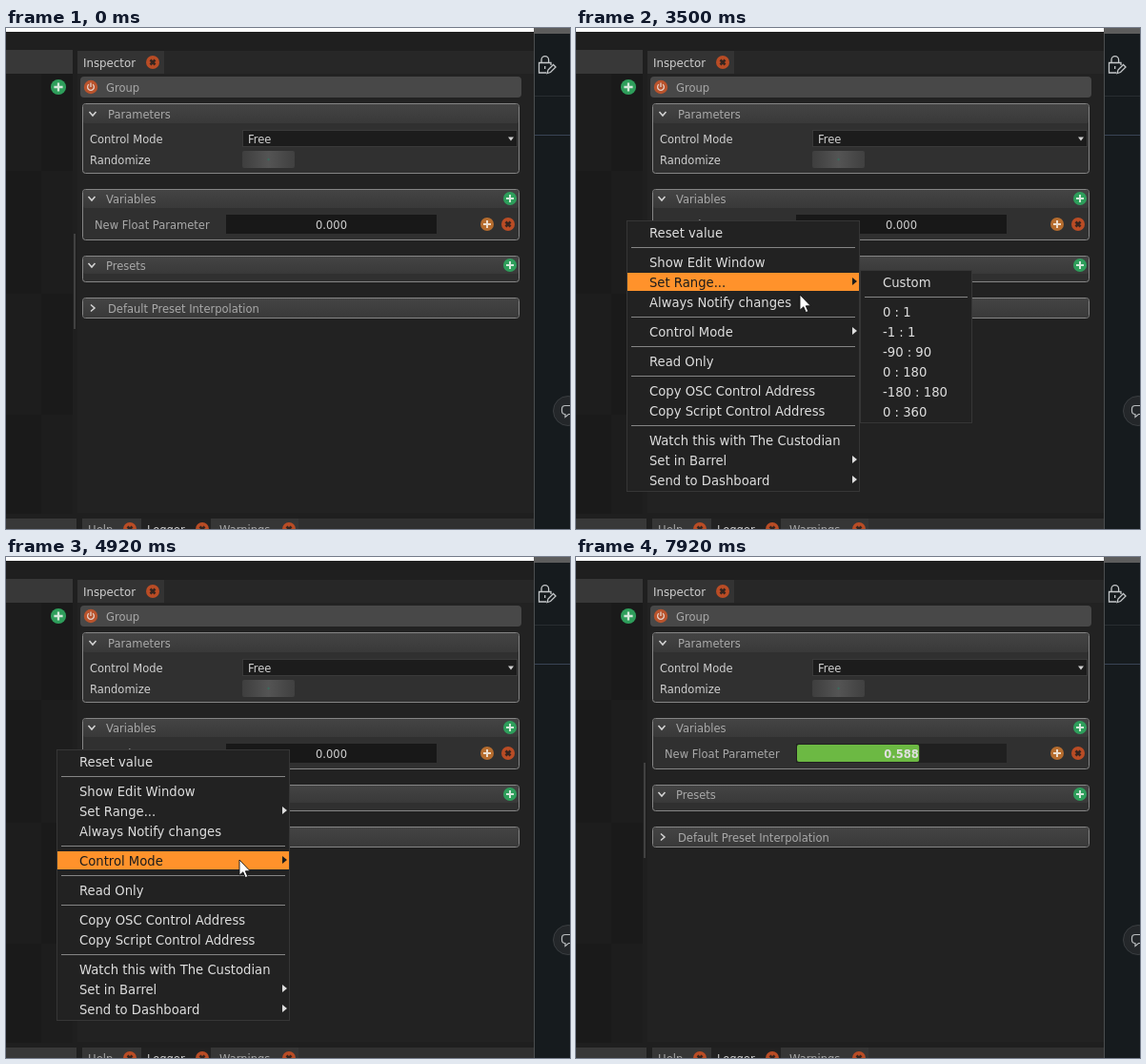
Recreate the animation shown at these times as an HTML page. Size 592 by 526 pixels, loop 8000 ms.

```html
<!DOCTYPE html>
<html lang="en">
<head>
<meta charset="utf-8">
<title>Set a parameter range</title>
<style>
  html, body { margin: 0; width: 100%; height: 100%; overflow: hidden; background: #222; }
  svg { display: block; width: 592px; height: 526px; }
  text { font: 11.5px "DejaVu Sans", sans-serif; fill: #cfcfcf; white-space: pre; }
  .dim { fill: #a9a9a9; }
  .mid { text-anchor: middle; }
  .bold { font-weight: bold; fill: #e0e0e0; }
  .menu text { font-size: 13.2px; fill: #dedede; }
  .menu .bg { fill: #222; stroke: #363636; }
  .menu .sep { fill: #858585; }
  .menu .arrow { fill: #dedede; }
  .menu .hot { fill: #ff922b; visibility: hidden; }
  .menu .on .hot { visibility: inherit; }
  .menu .on text, .menu .on .arrow { fill: #1c1c1c; }
  .box { fill: #303030; stroke: #858585; }
  .line { fill: none; stroke: #d5d5d5; stroke-width: 1.5; }
</style>
</head>
<body>
<svg viewBox="0 0 592 526">
  <defs>
    <linearGradient id="head" x2="0" y2="1">
      <stop stop-color="#444"/><stop offset="1" stop-color="#393939"/>
    </linearGradient>
    <linearGradient id="button">
      <stop stop-color="#3e3e3e"/><stop offset=".5" stop-color="#545454"/><stop offset="1" stop-color="#404040"/>
    </linearGradient>
    <path id="cross" d="M-2.5-2.5 2.5 2.5M2.5-2.5-2.5 2.5" stroke="#35251f" stroke-width="2.6"/>
    <g id="plus"><circle r="7" fill="#2e9e5b"/><path d="M-4 0H4M0-4V4" stroke="#d4e8da" stroke-width="2"/></g>
    <g id="close"><circle r="7" fill="#b94c25"/><use href="#cross"/></g>
    <path id="down" class="line" d="M-3.5-2 0 2 3.5-2"/>
  </defs>

  <!-- window frame and left panel -->
  <rect width="554" height="526" fill="#1f1f1f"/>
  <rect width="554" height="4" fill="#fff"/>
  <rect y="23" width="70" height="25" fill="#383838"/>
  <rect y="48" width="70" height="462" fill="#1d1d1d"/>
  <path d="M37 48h33v102H37zM0 150h37v129H0zM37 279h33v127H37zM0 406h37v104H0z" fill="#1a1a1a"/>
  <rect x="71" y="216" width="2" height="100" fill="#414141"/>
  <use href="#plus" transform="translate(55 62) scale(1.15)"/>

  <!-- inspector -->
  <rect x="75" y="24" width="479" height="24" fill="#272727"/>
  <rect x="75" y="24" width="91" height="24" fill="#333"/>
  <rect x="75" y="48" width="479" height="461" fill="#222"/>
  <text x="81" y="41" style="font-size:11.8px">Inspector</text>
  <use href="#close" x="154" y="36"/>
  <rect x="78" y="51" width="463" height="22" rx="4" fill="#484848"/>
  <circle cx="89" cy="62" r="7.2" fill="#b9532c"/>
  <path d="M86.9 59.3A3.4 3.4 0 1 0 91.1 59.3M89 57.5V62" fill="none" stroke="#e4cfc6" stroke-width="1.3"/>
  <text class="dim" x="105" y="67">Group</text>

  <g id="boxes"></g>
  <use href="#down" x="91" y="90"/><text class="dim" x="107" y="95">Parameters</text>
  <text x="88" y="121">Control Mode</text>
  <text x="88" y="143">Randomize</text>
  <rect x="248.5" y="107.5" width="288" height="17" fill="#1c1c1c" stroke="#3a3a3a"/>
  <text x="254" y="121">Free</text>
  <path d="M527 114.500h6l-3 4z" fill="#d0d0d0"/>
  <rect x="248" y="129" width="55" height="18" rx="2" fill="url(#button)"/>
  <circle cx="275.500" cy="138" r="1.200" fill="#3d6a5c"/>

  <use href="#down" x="90" y="179"/><text class="dim" x="105" y="184">Variables</text>
  <use href="#plus" x="529" y="179"/>
  <text class="dim" x="93" y="211">New Float Parameter</text>
  <rect id="field" x="231" y="196" width="221" height="20"/>
  <rect id="fill" x="232" y="197" height="18" rx="2" fill="#6cb943"/>
  <text id="value" class="mid" x="341.500" y="211"></text>
  <circle cx="505" cy="206" r="7" fill="#b56c2e"/>
  <path d="M501 206h8M505 202v8" stroke="#ecdccb" stroke-width="2"/>
  <use href="#close" x="527" y="206"/>

  <use href="#down" x="90" y="249"/><text class="dim" x="105" y="254">Presets</text>
  <use href="#plus" x="529" y="249"/>
  <use href="#down" transform="translate(91 294) rotate(-90)"/>
  <text class="dim" x="107" y="299">Default Preset Interpolation</text>

  <!-- bottom tabs -->
  <path d="M0 515h74v11H0z" fill="#383838"/>
  <path d="M80 515h474v11H80z" fill="#303030"/>
  <path d="M80 515h62v11H80zM215 515h92v11h-92z" fill="#363636"/>
  <path d="M142 515h73v11h-73z" fill="#222"/>
  <text x="86" y="531" class="dim">Help</text><use href="#close" x="130" y="526"/>
  <text x="148" y="531">Logger</text><use href="#close" x="206" y="526"/>
  <text x="224" y="531" class="dim">Warnings</text><use href="#close" x="297" y="526"/>

  <!-- neighbouring window -->
  <rect x="554" width="38" height="526" fill="#161b1e"/>
  <rect x="554" width="38" height="6" fill="#5d5d5d"/>
  <rect x="554" y="6" width="1" height="520" fill="#4b4e50"/>
  <path d="M555 71.500h37" stroke="#282d31"/>
  <path d="M555 112.500h37" stroke="#394456"/>
  <g fill="none" stroke="#c5c8ca" stroke-width="1.300">
    <path d="M567 47H559.500V36.500H572V39M562 36V33.500a3.800 3.800 0 0 1 7.600 0V36M565.700 40v3"/>
    <path d="M568 47.500l1-3.500 5.500-5.500 2.500 2.500-5.500 5.500z"/>
  </g>
  <circle cx="590" cy="402" r="15.500" fill="#24272a" stroke="#3a3e41"/>
  <path d="M592 396.500h-5a3.500 3.500 0 0 0-3.500 3.500v2a3.500 3.500 0 0 0 3.500 3.500v3l3.500-3h1.500" fill="none" stroke="#b9bcbe" stroke-width="1.200"/>

  <g id="menus"></g>
  <path id="cursor" d="M0 0V16.200L3.800 12.800 6.300 18.600 8.800 17.500 6.300 11.800H11.300Z" fill="#fff" stroke="#111" stroke-width=".9"/>
</svg>
<script>
const DURATION = 8000, STEP = 78.5, FIRST = 120;
const ROW = 21, GAP = 10;
const $ = id => document.getElementById(id);

function add(parent, tag, attrs, text) {
  const node = document.createElementNS('http://www.w3.org/2000/svg', tag);
  for (const name in attrs) node.setAttribute(name, attrs[name]);
  if (text) node.textContent = text;
  return parent.appendChild(node);
}

// Top, height and header height of each inspector section
for (const [y, height, head] of [[79, 74, 22], [169, 54, 21], [239, 28, 20], [283, 22, 22]]) {
  add($('boxes'), 'rect', { class: 'box', x: 80.5, y: y + .5, width: 458, height: height - 1, rx: 3 });
  add($('boxes'), 'rect', { x: 81, y: y + 1, width: 457, height: head - 2, rx: 2, fill: 'url(#head)' });
}

// '-' is a separator, a trailing '>' marks a submenu
function makeMenu(x, y, width, height, labels) {
  const root = add($('menus'), 'g', { class: 'menu' });
  add(root, 'rect', { class: 'bg', x: x + .5, y: y + .5, width: width - 1, height: height - 1 });
  const rows = [];
  let top = y + 3;
  for (const label of labels) {
    if (label === '-') {
      add(root, 'rect', { class: 'sep', x: x + 5, y: top + 4, width: width - 10, height: 1 });
      top += GAP;
      continue;
    }
    const node = add(root, 'g', {});
    add(node, 'rect', { class: 'hot', x: x + 1, y: top, width: width - 2, height: 19 });
    add(node, 'text', { x: x + 24, y: top + 15 }, label.replace('>', ''));
    if (label.endsWith('>'))
      add(node, 'path', { class: 'arrow', d: `M${x + width - 8} ${top + 5}l5 4-5 4z` });
    rows.push({ node, top });
    top += ROW;
  }
  return {
    show: on => root.setAttribute('visibility', on ? 'visible' : 'hidden'),
    rowAt: (px, py) => px > x && px < x + width - 1
      ? rows.findIndex(r => py >= r.top && py < r.top + ROW) : -1,
    light: index => rows.forEach((r, i) => r.node.classList.toggle('on', i === index))
  };
}

const SET_RANGE = 2, SEND = 10;
const mainMenu = makeMenu(53, 202, 245, 285, [
  'Reset value', '-', 'Show Edit Window', 'Set Range...>', 'Always Notify changes', '-',
  'Control Mode>', '-', 'Read Only', '-', 'Copy OSC Control Address',
  'Copy Script Control Address', '-', 'Watch this with The Custodian',
  'Set in Barrel>', 'Send to Dashboard>'
]);
const rangeMenu = makeMenu(298, 254, 118, 161,
  ['Custom', '-', '0 : 1', '-1 : 1', '-90 : 90', '0 : 180', '-180 : 180', '0 : 360']);
const sendMenu = makeMenu(298, 465, 174, 26, ['Default Dashboard']);

// Pointer tip: step, x, y
const path = [
  [0, 422, 459], [5, 310, 270], [7, 189, 170], [10, 321, 209], [13, 318, 205], [15, 318, 205],
  [16, 299, 204], [23, 299, 204], [27, 247, 204], [29, 247, 204], [32, 247, 227], [33, 247, 227],
  [36, 246, 264], [37, 246, 266], [42, 246, 266], [43, 235, 280], [49, 219, 418], [53, 222, 467],
  [57, 222, 467], [61, 245, 318], [64, 230, 264], [66, 230, 264], [69, 203, 266], [76, 348, 267],
  [77, 348, 267], [80, 348, 298], [81, 348, 298], [82, 348, 300], [87, 348, 300], [91, 344, 265],
  [92, 344, 265], [93, 340, 211]
];

function pointerAt(step) {
  const i = path.findIndex(key => key[0] >= step);
  const b = path[i < 0 ? path.length - 1 : i], a = path[Math.max(0, i - 1)];
  const k = i > 0 ? (step - a[0]) / (b[0] - a[0]) : 1;
  return [1, 2].map(n => Math.round(a[n] + (b[n] - a[n]) * k));
}

function render(time) {
  const step = Math.floor((time - FIRST) / STEP);
  const within = (from, to) => step >= from && step < to;

  const [x, y] = pointerAt(step);
  $('cursor').setAttribute('transform', `translate(${x} ${y})`);
  $('cursor').setAttribute('visibility', within(0, 94) ? 'visible' : 'hidden');

  const rangeOpen = within(37, 44) || within(65, 86);
  const sendOpen = within(54, 58);
  mainMenu.show(within(19, 86));
  rangeMenu.show(rangeOpen);
  sendMenu.show(sendOpen);
  mainMenu.light(rangeOpen ? SET_RANGE : sendOpen ? SEND : mainMenu.rowAt(x, y));
  rangeMenu.light(rangeMenu.rowAt(x, y));

  const ranged = step >= 86;
  const value = .588 * Math.min(1, Math.max(0, (step - 93) / 6));
  $('field').setAttribute('fill', ranged ? '#202020' : '#181818');
  $('fill').setAttribute('width', 218 * value);
  $('value').classList.toggle('bold', ranged);
  $('value').textContent = value.toFixed(3);
}

const start = performance.now();
function tick() {
  render((performance.now() - start) % DURATION);
  requestAnimationFrame(tick);
}
tick();
</script>
</body>
</html>
```
